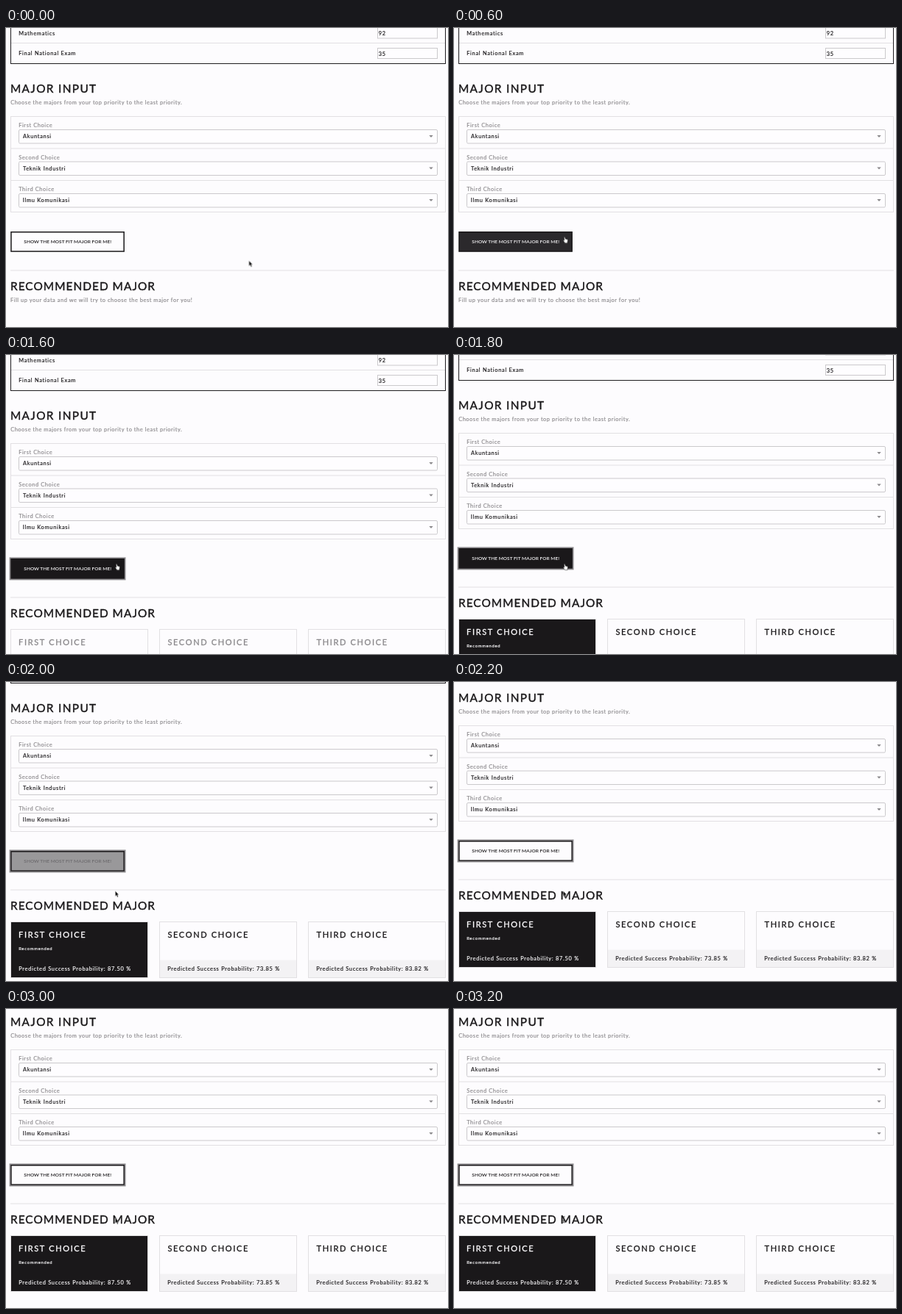
Animation of 600 by 407 pixels, one loop 4200 ms. Source, as an HTML page:

```html
<!DOCTYPE html>
<html lang="en">
<head>
<meta charset="utf-8">
<title>Major recommendation</title>
<style>
  html, body { margin: 0; width: 100%; height: 100%; overflow: hidden; background: #fdfcfe; }
  svg { display: block; width: 100%; height: 100%; }

  /* A thin stroke in the text colour gives a soft semi-bold. */
  text {
    font: 400 7.4px Lato, "Open Sans", sans-serif;
    letter-spacing: .72px;
    color: #1a181a;
    fill: currentColor;
    stroke: currentColor;
    stroke-width: .17px;
    stroke-linejoin: round;
  }
  .h1 { font-size: 15.4px; letter-spacing: 1.33px; stroke-width: .42px; }
  .h1.long { letter-spacing: 1.04px; }
  .h2 { font-size: 11px; letter-spacing: 1.65px; stroke-width: .32px; }
  .muted { letter-spacing: .62px; color: #8a888b; }
  .note { letter-spacing: .56px; }
  .tag { font-size: 5.8px; letter-spacing: .74px; }
  .label { font-size: 6.5px; font-weight: 600; letter-spacing: .04px; stroke: none; }

  .line { fill: none; stroke: #e2e0e3; }
  .dark { fill: none; stroke: #1f1d20; }
  .field { fill: #fefdff; stroke: #cbc9cc; }
  .caret { fill: #8a888b; }
  .strip { fill: #f3f2f4; }
  .button { stroke: #1a181a; stroke-width: 1.5; }
  .ring { fill: none; stroke: #8b898c; stroke-width: 1.6; }
  .pick { fill: #1a181a; }
  .pick ~ text { color: #fdfcfe; }

  /* All states switch in hard steps of one shared 4.2 s clock. */
  .page, .button, .label, .ring, .hint, .cards, .body, .title, .title1,
  .pointer, .arrow, .hand, .beam { animation: 4.2s step-end infinite; }

  .page { animation-name: scroll; }
  @keyframes scroll {
    0% { transform: translateY(0); }
    42.85% { transform: translateY(-14px); }
    47.61% { transform: translateY(-47px); }
    52.38% { transform: translateY(-61px); }
    57.14% { transform: translateY(-65px); }
    61.9% { transform: translateY(-67px); }
    71.42%, 100% { transform: translateY(-65px); }
  }

  .button { animation-name: fill; }
  @keyframes fill {
    0% { fill: #fdfcfe; }
    14.28% { fill: #2b292c; }
    19.04% { fill: #1a181a; }
    47.61% { fill: #99989a; }
    52.38%, 100% { fill: #fdfcfe; }
  }
  .label { animation-name: label; }
  @keyframes label {
    0% { color: #1a181a; }
    14.28% { color: #fdfcfe; }
    47.61% { color: #6c6a6d; }
    52.38%, 100% { color: #1a181a; }
  }

  .ring { animation-name: focus; }
  @keyframes focus { 0% { opacity: 0; } 23.8%, 100% { opacity: 1; } }
  .hint { animation-name: leave; }
  @keyframes leave { 0% { opacity: 1; } 38.09%, 100% { opacity: 0; } }
  .cards { animation-name: enter; }
  @keyframes enter { 0% { opacity: 0; } 38.09%, 100% { opacity: 1; } }
  .body { animation-name: settle; }
  @keyframes settle { 0% { opacity: 0; } 42.85%, 100% { opacity: 1; } }
  .title { animation-name: ink; }
  @keyframes ink { 0% { color: #8a888b; } 42.85%, 100% { color: #1a181a; } }
  .title1 { animation-name: invert; }
  @keyframes invert { 0% { color: #8a888b; } 42.85%, 100% { color: #fdfcfe; } }

  .pointer { animation-name: move; }
  @keyframes move {
    0% { transform: translate(329.5px, 316.5px); }
    4.76% { transform: translate(221.5px, 280px); }
    9.52% { transform: translate(167.5px, 278px); }
    14.28%, 100% { transform: translate(148px, 284.2px); }
  }
  .arrow { animation-name: arrow; }
  @keyframes arrow {
    0% { opacity: 1; }
    14.28% { opacity: 0; }
    47.61% { opacity: 1; }
    76.19%, 100% { opacity: 0; }
  }
  .hand { animation-name: hand; }
  @keyframes hand { 0% { opacity: 0; } 14.28% { opacity: 1; } 47.61%, 100% { opacity: 0; } }
  .beam { animation-name: beam; }
  @keyframes beam { 0% { opacity: 0; } 76.19%, 100% { opacity: 1; } }
</style>
</head>
<body>
<svg viewBox="0 0 600 407" preserveAspectRatio="none">
  <defs>
    <g id="select">
      <rect class="field" x="17.5" y="138.5" width="568" height="18.5" rx="1.5"/>
      <path class="caret" d="M574.3 146h5.4l-2.7 3z"/>
    </g>
    <rect id="card" class="line" x=".5" y="373.5" width="186" height="76"/>
  </defs>

  <g class="page">
    <path class="line" d="M7 20.5H596"/>
    <rect class="dark" x="6.5" y="-20.5" width="590" height="69"/>
    <rect class="field" x="504.5" y="-.5" width="81" height="14.5"/>
    <rect class="field" x="504.5" y="27.5" width="81" height="14"/>
    <text x="17.2" y="9.7">Mathematics</text>
    <text x="505.8" y="9.9">92</text>
    <text x="17.2" y="37.4">Final National Exam</text>
    <text x="505.8" y="37.6">35</text>

    <text class="h1" x="6" y="88">MAJOR INPUT</text>
    <text class="muted note" x="6.2" y="104.2">Choose the majors from your top priority to the least priority.</text>

    <rect class="line" x="6.5" y="120.5" width="590" height="130"/>
    <path class="line" d="M7 164H596M7 207.5H596"/>
    <use href="#select"/>
    <use href="#select" y="43.5"/>
    <use href="#select" y="87"/>
    <text class="muted" x="17.2" y="135">First Choice</text>
    <text x="23" y="150.2">Akuntansi</text>
    <text class="muted" x="17.2" y="178.5">Second Choice</text>
    <text x="23" y="193.7">Teknik Industri</text>
    <text class="muted" x="17.2" y="222">Third Choice</text>
    <text x="22.8" y="237.2">Ilmu Komunikasi</text>

    <rect class="ring" x="5.4" y="276.2" width="156.3" height="29.4"/>
    <rect class="button" x="6.95" y="277.75" width="153.2" height="26.3"/>
    <text class="label" x="24.3" y="292.9">SHOW THE MOST FIT MAJOR FOR ME!</text>

    <path class="line" d="M6 330H597"/>
    <text class="h1 long" x="6" y="357">RECOMMENDED MAJOR</text>
    <text class="muted note hint" x="6" y="373.2">Fill up your data and we will try to choose the best major for you!</text>

    <g class="cards">
      <g transform="translate(6 0)">
        <g class="body">
          <rect class="pick" y="373" width="187" height="77"/>
          <text class="tag" x="11.2" y="411.6">Recommended</text>
          <text x="11.2" y="440.2">Predicted Success Probability: 87.50 %</text>
        </g>
        <use href="#card"/>
        <text class="h2 title1" x="11.1" y="394.6">FIRST CHOICE</text>
      </g>
      <g transform="translate(208 0)">
        <g class="body">
          <rect class="strip" y="425.5" width="187" height="24.5"/>
          <text x="11.2" y="440.2">Predicted Success Probability: 73.85 %</text>
        </g>
        <use href="#card"/>
        <text class="h2 title" x="11.4" y="394.6">SECOND CHOICE</text>
      </g>
      <g transform="translate(410 0)">
        <g class="body">
          <rect class="strip" y="425.5" width="187" height="24.5"/>
          <text x="11.2" y="440.2">Predicted Success Probability: 83.82 %</text>
        </g>
        <use href="#card"/>
        <text class="h2 title" x="11.5" y="394.6">THIRD CHOICE</text>
      </g>
    </g>
  </g>

  <g class="pointer">
    <path class="arrow" d="M.3 .2V7.4L1.9 5.9 3.1 8.7 4.4 8.1 3.2 5.4H5.3z" fill="#111" stroke="#fff" stroke-width=".4"/>
    <path class="hand" d="M1.4 .6Q2.1 0 2.6 .8L3.4 3 5.8 3.6Q6.6 3.9 6.5 5L6 7V8.4H2.7L.6 5.6Q-.2 4.4 .9 4.4L1.9 5z" fill="#fff" stroke="#222" stroke-width=".5"/>
    <path class="beam" d="M-.6 -1.8Q1 -1.8 1 -.8 1 -1.8 2.6 -1.8M1 -.8V5.6M-.2 3.6H2.2M-.6 6.6Q1 6.6 1 5.6 1 6.6 2.6 6.6" fill="none" stroke="#222" stroke-width=".8"/>
  </g>
</svg>
</body>
</html>
```
